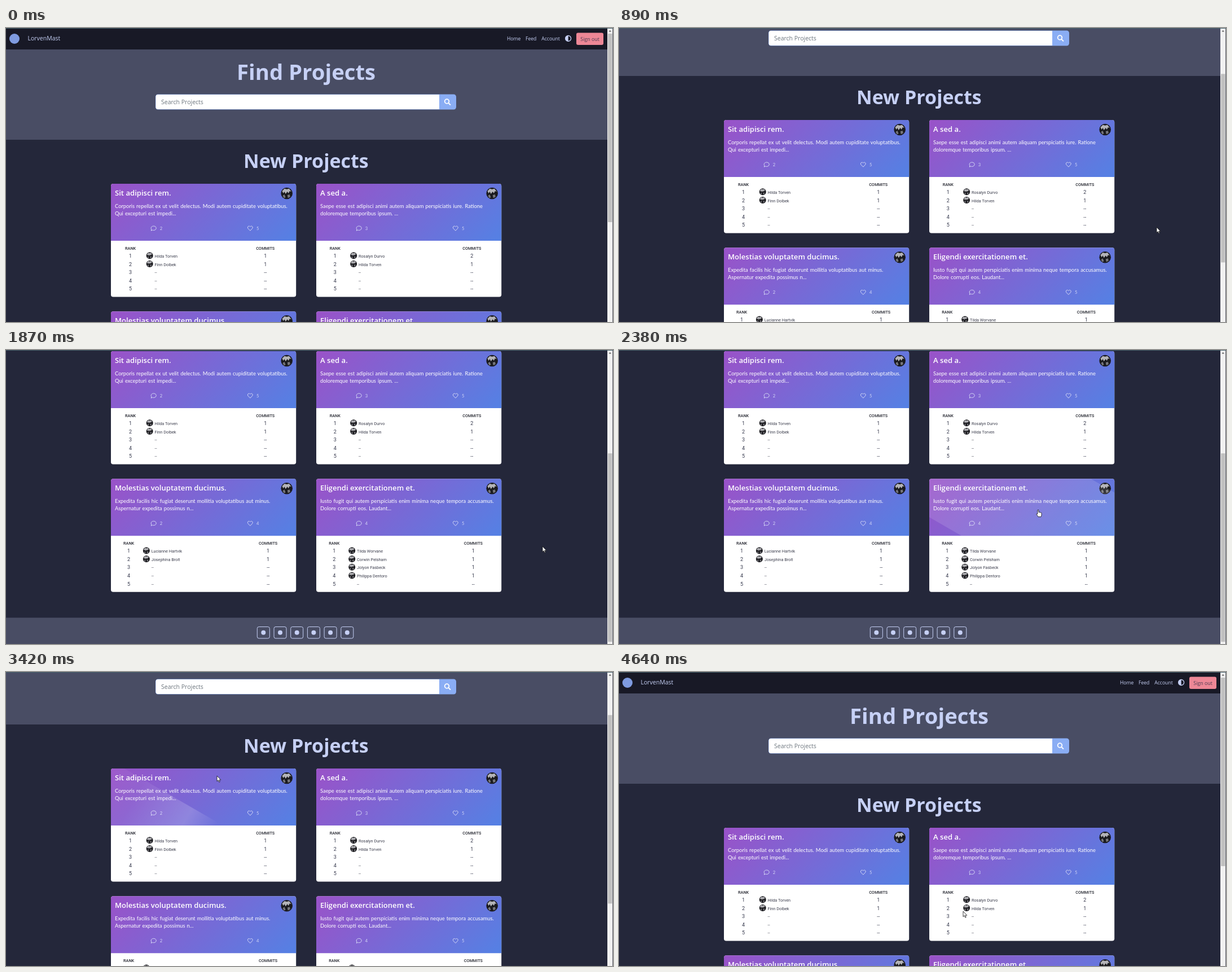
These frames come from a looping animation (1076x521 px, 4670 ms). An HTML page:

```html
<!DOCTYPE html>
<html lang="en">
<head>
<meta charset="utf-8">
<title>Projects</title>
<style>
  html, body { margin: 0; width: 100%; height: 100%; overflow: hidden; background: #24273a; }
  svg { display: block; width: 1076px; height: 521px; }
  text { font-family: "Open Sans", "Noto Sans", sans-serif; fill: #c6d0f5; white-space: pre; }
  .h1 { font-size: 38.3px; font-weight: 700; }
  .h2 { font-size: 34px; font-weight: 700; }
  .brand, .hint { font-size: 10.5px; }
  .hint { fill: #6c757d; }
  .nav { font-size: 8.6px; }
  .out { font-size: 8.85px; fill: #4a3a50; }
  .title { font-size: 13.1px; font-weight: 600; fill: #fff; }
  .body { font: 9.35px Lato, sans-serif; word-spacing: .07em; fill: #fff; }
  .stat { font: 7.6px Lato, sans-serif; fill: #d6d9f6; }
  .th { font: 500 7.25px Roboto, sans-serif; fill: #24262f; }
  .num { font: 9px Roboto, sans-serif; fill: #33364a; }
  .who { font: 7.3px Roboto, sans-serif; fill: #3b3d4c; }
  .th, .num { text-anchor: middle; }
  .line { fill: none; stroke: #d6d9f6; stroke-linejoin: round; }
</style>
</head>
<body>
<svg viewBox="0 0 1076 521">
  <defs>
    <linearGradient id="head" gradientUnits="userSpaceOnUse" x1="56.8" y1="-56.8" x2="271.4" y2="157.8">
      <stop stop-color="#9a52c8"/><stop offset="1" stop-color="#5481e4"/>
    </linearGradient>
    <linearGradient id="gloss">
      <stop stop-color="#fff" stop-opacity=".13"/>
      <stop offset=".77" stop-color="#fff" stop-opacity=".13"/>
      <stop offset=".92" stop-color="#fff" stop-opacity=".5"/>
      <stop offset="1" stop-color="#fff" stop-opacity="0"/>
    </linearGradient>
    <g id="photo">
      <circle r="10" fill="#1a1a1e"/>
      <path d="M-8-4L-4-8L0-7L4-8L8-3L5-4L3 0L1-3L-2 1L-4-3L-6 0Z" fill="#b4b4b8"/>
      <path d="M-7 4L-4 2L-2 7L-5 8ZM1 3L5 2L6 6L2 8Z" fill="#77777c"/>
    </g>
    <path id="bubble" class="line" d="M0-4C6-4 6 3.4 0 3.4Q-1.4 3.4-2.2 3L-4.4 4.2L-3.8 1.8C-5.8-1-3.6-4 0-4Z"/>
    <path id="heart" class="line" d="M0 4.2L-3.7.4C-6-2.4-2.2-5.8 0-2.7C2.2-5.8 6-2.4 3.7.4Z"/>
  </defs>
  <g id="page"></g>
  <rect x="1066" width="9" height="521" fill="#f1f1f1"/>
  <path d="M1068.5 6.5L1070.7 4L1073 6.5Z" fill="#555"/>
  <rect id="thumb" x="1067" width="7.5" height="334" fill="#c1c1c1"/>
  <rect x="1075" width="1" height="521" fill="#5a5d68"/>
  <rect width="1076" height="1" fill="#46606a"/>
  <g id="cursor" fill="#fff" stroke="#111" stroke-width=".8" stroke-linejoin="round">
    <path id="arrow" d="M0 0V9.6L2.2 7.7L3.8 11.2L5.3 10.5L3.8 7.2H6.8Z"/>
    <path id="hand" d="M-1 6.5V.8Q0-.5 1 .8V4.6Q2 3.8 3 4.9Q4 4.3 4.6 5.3Q6 5 6 6.5V9Q6 11 5 12.6H0Q-1 10.5-3 8.3Q-3.3 6.6-1 7.8Z"/>
  </g>
</svg>
<script>
const LOOP = 4670, W = 328.2, HEAD = 101, CARD = 200.5;
const NOTCH = 56.25, MAX_SCROLL = 274, SWEEP = 450;
const $ = id => document.getElementById(id);

// "squeeze" narrows the rank column when the names are longer
const cards = [
  { title: 'Sit adipisci rem.', stats: [2, 5], squeeze: 0,
    body: ['Corporis repellat ex ut velit delectus. Modi autem cupiditate voluptatibus.', 'Qui excepturi est impedi...'],
    rows: [['Hilda Torven', 1], ['Finn Dolbek', 1]] },
  { title: 'A sed a.', stats: [3, 5], squeeze: 1.3,
    body: ['Saepe esse est adipisci animi autem aliquam perspiciatis iure. Ratione', 'doloremque temporibus ipsum. ...'],
    rows: [['Rosalyn Durvo', 2], ['Hilda Torven', 1]] },
  { title: 'Molestias voluptatem ducimus.', stats: [2, 4], squeeze: 3,
    body: ['Expedita facilis hic fugiat deserunt mollitia voluptatibus aut minus.', 'Aspernatur expedita possimus n...'],
    rows: [['Lucianne Hartvik', 1], ['Josephina Brolt', 1]] },
  { title: 'Eligendi exercitationem et.', stats: [4, 5], squeeze: 2.8,
    body: ['Iusto fugit qui autem perspiciatis enim minima neque tempora accusamus.', 'Dolore corrupti eos. Laudant...'],
    rows: [['Tilda Worvane', 1], ['Corwin Pelsham', 1], ['Jolyon Fasbeck', 1], ['Philippa Dentoro', 1]] }
];
cards.forEach((c, i) => {
  c.x = 186 + 364 * (i % 2);
  c.y = 276 + 226.3 * (i >> 1);
});

const text = (cls, x, y, s) => `<text class="${cls}" x="${x}" y="${y}">${s}</text>`;
const rect = (x, y, w, h, fill, more = '') =>
  `<rect x="${x}" y="${y}" width="${w}" height="${h}" fill="${fill}" ${more}/>`;
const use = (id, x, y, k = 1) => `<use href="#${id}" transform="translate(${x} ${y}) scale(${k})"/>`;
const repeat = (n, f) => Array.from({ length: n }, (_, i) => f(i)).join('');

function table({ rows, squeeze }) {
  const rank = 34.6 - squeeze, photo = 68.7 - 1.95 * squeeze, commits = 273.7 + 1.65 * squeeze;
  return text('th', rank, 116.6, 'RANK') + text('th', commits, 116.6, 'COMMITS') + repeat(5, i => {
    const [who, count] = rows[i] || ['--', '--'], y = 131 + 14.6 * i;
    return text('num', rank, y, i + 1) + (rows[i] ? use('photo', photo, y - 3.7, .6) : '') +
      text('who', photo + 8.8, y, who) + text('num', commits, y, count);
  });
}

function card(c, i) {
  const shape = `M0 ${HEAD}V4Q0 0 4 0H${W - 4}Q${W} 0 ${W} 4V${HEAD}Z`;
  return `<g transform="translate(${c.x} ${c.y})">
    ${rect(0, 0, W, CARD, '#fff', 'rx="4"')}
    <path d="${shape}" fill="url(#head)"/>
    <clipPath id="clip${i}"><path d="${shape}"/></clipPath>
    ${text('title', 7, 21, c.title)}
    ${c.body.map((s, n) => text('body', 7, 42.6 + 13.5 * n, s)).join('')}
    ${use('photo', 311.7, 17, 1.03)}
    ${use('bubble', 75.7, 79)}${text('stat', 86.8, 81.8, c.stats[0])}
    ${use('heart', 246.8, 79)}${text('stat', 258, 81.8, c.stats[1])}
    ${table(c)}
    <g clip-path="url(#clip${i})">${rect(0, 0, 2 * W, 2 * HEAD, 'url(#gloss)', `id="shine${i}"`)}</g>
  </g>`;
}

const navbar = rect(0, 0, 1066, 38, '#181926') +
  '<circle cx="15" cy="19" r="9" fill="#7f9be0"/>' +
  text('brand', 38.5, 22, 'LorvenMast') +
  text('nav', 888, 22.4, 'Home') + text('nav', 921, 22.4, 'Feed') + text('nav', 949.3, 22.4, 'Account') +
  '<circle cx="996.6" cy="18.5" r="5" fill="none" stroke="#c6d0f5" stroke-width="1.3"/>' +
  '<path d="M996.6 13.5A5 5 0 0 0 996.6 23.5Z" fill="#c6d0f5"/>' +
  rect(1011, 8.5, 48, 21.5, '#ed8796', 'rx="3"') + text('out', 1018.3, 22.6, 'Sign out');

const hero = rect(0, 38, 1066, 160, '#494d64') +
  text('h1', 409, 91.8, 'Find Projects') +
  rect(265, 117.5, 533, 27, '#8aadf4', 'rx="4.5"') +
  '<path d="M768 118H269.5Q265.5 118 265.5 122V140Q265.5 144 269.5 144H768Z" fill="#fff"/>' +
  text('hint', 275, 135, 'Search Projects') +
  '<g fill="none" stroke="#fff" stroke-width="1.8"><circle cx="781.5" cy="130" r="3.8"/><path d="M784.3 132.8L788 136.5"/></g>';

const footer = rect(0, 748.4, 1066, 47, '#494d64') + repeat(6, i => {
  const x = 445.3 + 29.7 * i;
  return rect(x, 764.5, 22, 20.5, 'none', 'rx="3" stroke="#c6d0f5"') +
    `<circle cx="${x + 11}" cy="774.7" r="4" fill="#c6d0f5"/>`;
});

$('page').innerHTML = navbar + hero + text('h2', 421, 247.8, 'New Projects') +
  cards.map(card).join('') + footer;

// Wheel notches going down, then one steady run back up
const notches = [680, 860, 980, 1100, 1190];
function scrollAt(t) {
  const down = Math.min(MAX_SCROLL, NOTCH * notches.filter(n => t >= n).length);
  const up = .806 * Math.max(0, t - 3211);
  return Math.round(Math.max(0, down - up));
}

// Pointer stops: [time, x, y]
const stops = [[50, 992, 487], [590, 953, 354], [1330, 953, 352], [1460, 953, 349], [1840, 953, 349],
  [2380, 743, 283], [2410, 743, 283], [2900, 385, 240], [3100, 361, 202], [3420, 374, 184],
  [4040, 522, 277], [4340, 648, 430], [4640, 610, 424]];

function pointerAt(t) {
  const n = stops.findIndex(s => s[0] > t);
  if (n < 1) return stops[n ? stops.length - 1 : 0].slice(1);
  const [t0, x0, y0] = stops[n - 1], [t1, x1, y1] = stops[n];
  const u = (t - t0) / (t1 - t0), p = u * u * (3 - 2 * u);
  return [x0 + (x1 - x0) * p, y0 + (y1 - y0) * p];
}

// Index of the card whose header lies under the pointer, or -1
function hoverAt(t) {
  const [x, y] = pointerAt(t), top = y + scrollAt(t);
  return cards.findIndex(c => x >= c.x && x < c.x + W && top >= c.y && top < c.y + HEAD);
}

function hoverAge(t, i) {
  let age = 0;
  while (age < SWEEP && hoverAt(t - age) === i) age += 2;
  return age;
}

const bezier = (u, p, q) => 3 * u * (1 - u) ** 2 * p + 3 * u * u * (1 - u) * q + u ** 3;

// CSS "ease"
function ease(x) {
  let lo = 0, hi = 1;
  for (let i = 0; i < 20; i++) {
    const u = (lo + hi) / 2;
    if (bezier(u, .25, .25) < x) lo = u; else hi = u;
  }
  return bezier(lo, .1, 1);
}

function draw(t) {
  const scroll = scrollAt(t), over = hoverAt(t);
  $('page').setAttribute('transform', `translate(0 ${-scroll})`);
  $('thumb').setAttribute('y', 10 + scroll * .632);

  cards.forEach((c, i) => {
    const p = i === over ? ease(Math.min(1, hoverAge(t, i) / SWEEP)) : 0;
    const left = (-2.1 + 1.8 * p) * W, top = (-1.1 + .8 * p) * HEAD;
    $('shine' + i).setAttribute('transform', `translate(${left} ${top}) rotate(30 ${W} ${HEAD})`);
    $('shine' + i).setAttribute('opacity', p);
  });

  // The pointer shape only changes while the page is at rest
  const hand = over >= 0 && scrollAt(t - 20) === scroll;
  const [x, y] = pointerAt(t).map(Math.round);
  $('cursor').setAttribute('transform', `translate(${x} ${y})`);
  $('cursor').style.display = t < 80 ? 'none' : '';
  $('arrow').style.display = hand ? 'none' : '';
  $('hand').style.display = hand ? '' : 'none';
}

const start = performance.now();
function tick() {
  draw((performance.now() - start) % LOOP);
  requestAnimationFrame(tick);
}
tick();
</script>
</body>
</html>
```
